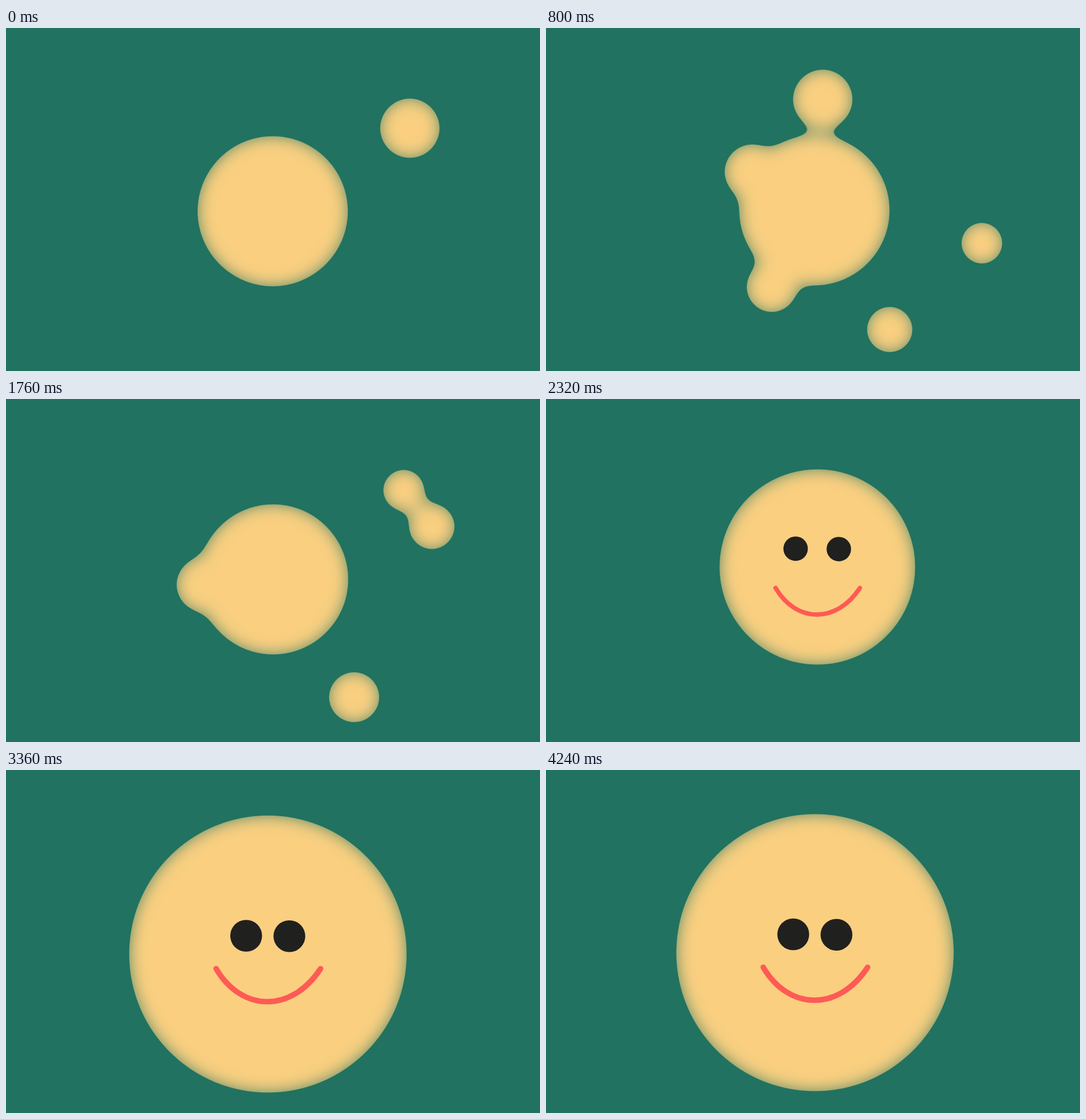
An HTML page that plays this animation: 933x600 px, repeating every 4320 ms.

```html
<!DOCTYPE html>
<html lang="en">
<head>
<meta charset="utf-8">
<title>Blob face</title>
<style>
html, body { margin: 0; width: 100%; height: 100%; overflow: hidden; background: #217260; }
svg { display: block; width: 100%; height: 100%; }
</style>
</head>
<body>
<svg viewBox="0 0 933 600">
  <filter id="goo" filterUnits="userSpaceOnUse" x="0" y="0" width="933" height="600" color-interpolation-filters="sRGB">
    <feGaussianBlur stdDeviation="14" result="soft"/>
    <feColorMatrix values="1 0 0 0 0  0 1 0 0 0  0 0 1 0 0  0 0 0 30 -14.5" result="mask"/>
    <feComponentTransfer in="soft" result="shade">
      <feFuncA type="gamma" exponent="0.7"/>
    </feComponentTransfer>
    <feComposite in="shade" in2="mask" operator="in"/>
  </filter>
  <g id="blobs" filter="url(#goo)" fill="#facf80"></g>
  <g id="face">
    <g fill="#20201e">
      <circle class="eye" cx="-38" cy="-32"/>
      <circle class="eye" cx="37.5" cy="-31.3"/>
    </g>
    <path id="mouth" d="M-90.5 -58C-46 18 41 20 92 -58" fill="none" stroke="#ff5a55" stroke-width="9.6" stroke-linecap="round"/>
  </g>
</svg>
<script>
const LOOP = 4320, STEP = 80, LAG = 160, BLUR = 14;
const TURN = 1200, LIFE = 1600, GROW = 2240;

// Points the head drifts through: [time, x, y]
const DRIFT = [
  [0, 466, 320.5], [800, 469, 319], [1120, 462, 318.5], [1760, 466.7, 315.5],
  [3360, 457.6, 322], [3680, 473, 319], [4240, 470, 319.5]
];

const byId = id => document.getElementById(id);
const clamp = v => Math.max(0, Math.min(1, v));
const ease = u => (1 - Math.cos(Math.PI * u)) / 2;

function drift(t) {
  const i = Math.max(1, DRIFT.findIndex(p => p[0] >= t));
  const [a, b] = [DRIFT[i - 1], DRIFT[i]];
  const u = ease((t - a[0]) / (b[0] - a[0]));
  return [1, 2].map(c => a[c] + (b[c] - a[c]) * u);
}

// Orbit angle in degrees: a first turn slowing down, then a quick second one
function orbit(age) {
  const first = 70.5 + 249 * Math.sin(0.0016 * (Math.min(age, TURN) - 300));
  return first + 236.6 * ease(clamp((age - TURN) / 480));
}

const blobs = Array.from({ length: 6 }, () =>
  byId("blobs").appendChild(document.createElementNS("http://www.w3.org/2000/svg", "circle")));
const [head, ...balls] = blobs;
const eyes = document.querySelectorAll(".eye");

// The added radius makes up for the shrinking caused by the blur
function place(blob, x, y, r) {
  blob.setAttribute("cx", x);
  blob.setAttribute("cy", y);
  blob.setAttribute("r", r && r + BLUR * BLUR / (2 * r));
}

function draw(t) {
  const grow = clamp((t - GROW) / 224), hop = Math.sin(Math.PI * grow);
  let [x, y] = drift(t);
  x += 11 * hop;
  y -= 26 * hop;
  place(head, x, y, 131.2 + 111.1 * grow);

  balls.forEach((ball, i) => {
    const age = t - i * LAG;
    const angle = orbit(age) * Math.PI / 180;
    const size = age >= 0 && age <= LIFE ? 51.6 - 4.1 * i : 0;
    place(ball, x + 89.5 + 210.4 * Math.cos(angle), y + 2.3 + 210.4 * Math.sin(angle), size);
  });

  byId("face").style.display = t > GROW ? "" : "none";
  byId("face").setAttribute("transform", `translate(${x} ${y})`);
  eyes.forEach(eye => eye.setAttribute("r", 27.8 * (0.64 + 0.36 * grow)));
  byId("mouth").setAttribute("transform", `translate(0 83.5) scale(${0.7 + 0.3 * grow})`);
}

const start = performance.now();
function tick() {
  const t = (performance.now() - start) % LOOP;
  draw(Math.floor(t / STEP) * STEP);
  requestAnimationFrame(tick);
}
tick();
</script>
</body>
</html>
```
